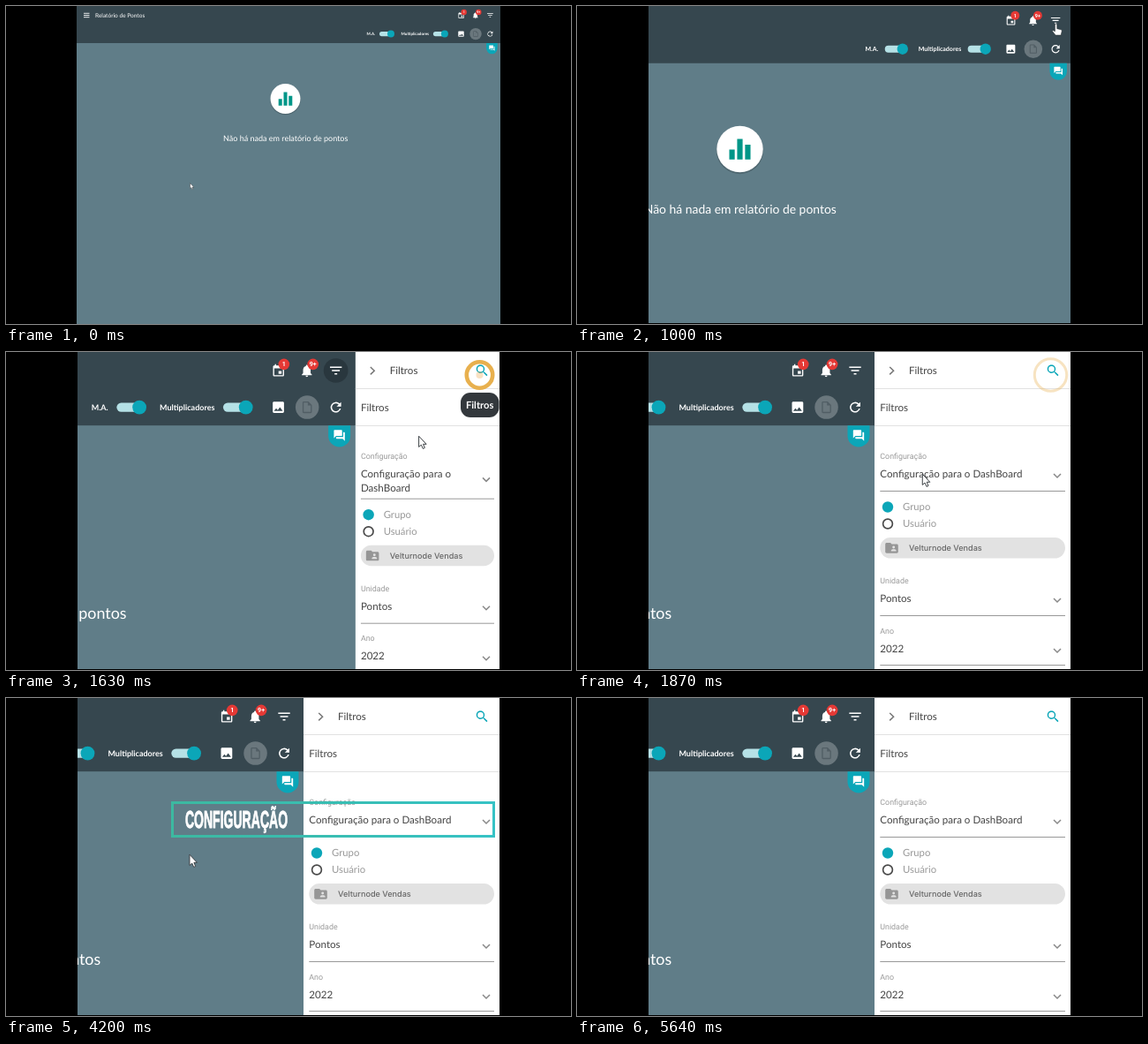
An HTML page that plays this animation: 640x360 px, repeating every 5670 ms.

```html
<!DOCTYPE html>
<html lang="pt">
<head>
<meta charset="utf-8">
<title>Filtros</title>
<style>
  html, body { margin: 0; width: 100%; height: 100%; overflow: hidden; background: #000; }
  svg { display: block; width: 640px; height: 360px; }
  text { font-family: Lato, "Open Sans", sans-serif; text-rendering: geometricPrecision; white-space: pre; }
  .label { font: 8.9px Roboto, sans-serif; fill: #9a9a9a; }
  .value { font-size: 11.6px; fill: #444; }
  .option { font-size: 11.3px; fill: #999; }
  .badge { font: 700 3.6px Roboto, sans-serif; fill: #fff; text-anchor: middle; }
  .toggle { font-size: 4.55px; font-weight: 700; fill: #fff; }
  .caption { font: 700 27.5px "Liberation Sans", Arial, sans-serif; fill: #fff; stroke: #fff; stroke-width: 1; text-anchor: middle; }
</style>
</head>
<body>
<svg viewBox="0 0 640 360" xmlns="http://www.w3.org/2000/svg">
  <defs>
    <clipPath id="screen"><rect id="frame"/></clipPath>
    <linearGradient id="sweep" gradientUnits="userSpaceOnUse" y1="0" y2="0">
      <stop offset="0" stop-color="#3cb9a0" stop-opacity="0"/>
      <stop offset=".03" stop-color="#3cb9a0"/>
      <stop offset=".97" stop-color="#36c3c8"/>
      <stop offset="1" stop-color="#36c3c8" stop-opacity="0"/>
    </linearGradient>
  </defs>
  <rect width="640" height="360" fill="#000"/>
  <g clip-path="url(#screen)">
    <g id="camera"></g>
    <g id="drawer"></g>
    <g id="tooltip">
      <rect x="515" y="46" width="43.5" height="28" rx="11" fill="#33383c"/>
      <text x="536.7" y="63.5" font-size="11.2" font-weight="700" fill="#fff" text-anchor="middle">Filtros</text>
    </g>
    <circle id="dot" cx="536.5" cy="26" r="4" fill="#e9a64a"/>
    <circle id="ring" cx="536.5" cy="26" fill="none" stroke="#e8b04e"/>
    <rect id="box" x="188.5" y="118.5" width="364" height="38" fill="none" stroke="url(#sweep)" stroke-width="3"/>
    <g id="caption"><text class="caption" transform="translate(261 147.2) scale(.51 1)">CONFIGURAÇÃO</text></g>
    <g id="cursor">
      <path id="arrow" d="M0 0V6.2L1.4 5 2.4 7.2 3.4 6.7 2.5 4.6H4.3Z" fill="#fff" stroke="#3a3f43" stroke-width=".5"/>
      <path id="hand" transform="translate(.6 0) scale(1.1)" d="M-.7 .4Q0-.5 .7 .4V3.2L3.4 3.9Q4.1 4.2 3.9 5L3.3 7.6H-.3L-2.5 4.8Q-2.1 3.9-.7 5Z" fill="#fff" stroke="#2a3034" stroke-width=".35"/>
    </g>
  </g>
</svg>
<script>
const LOOP = 5670, ZOOM = 1.98, EDGE = 559, OPEN = 222, TEAL = '#0ba6b8';
const $ = id => document.getElementById(id);
const set = (id, attrs) => { for (const k in attrs) $(id).setAttribute(k, attrs[k]); };

const ICONS = {
  event: 'M17 12h-5v5h5v-5zM16 1v2H8V1H6v2H5c-1.1 0-2 .9-2 2v14c0 1.1.9 2 2 2h14c1.1 0 2-.9 2-2V5c0-1.1-.9-2-2-2h-1V1h-2zm3 18H5V8h14v11z',
  bell: 'M12 22c1.1 0 2-.9 2-2h-4c0 1.1.9 2 2 2zm6-6v-5c0-3.1-1.6-5.6-4.5-6.3V4a1.5 1.5 0 0 0-3 0v.7C7.6 5.4 6 7.9 6 11v5l-2 2v1h16v-1l-2-2z',
  filter: 'M10 18h4v-2h-4zM3 6v2h18V6zM6 13h12v-2H6z',
  image: 'M21 19V5c0-1.1-.9-2-2-2H5c-1.1 0-2 .9-2 2v14c0 1.1.9 2 2 2h14c1.1 0 2-.9 2-2zM8.5 13.5l2.5 3 3.5-4.5 4.5 6H5l3.5-4.5z',
  file: 'M14 2H6c-1.1 0-2 .9-2 2v16c0 1.1.9 2 2 2h12c1.1 0 2-.9 2-2V8l-6-6zM6 20V4h7v5h5v11H6z',
  refresh: 'M17.65 6.35A8 8 0 1 0 19.73 14h-2.08A6 6 0 1 1 16.22 7.78L13 11h7V4z',
  chat: 'M21 6h-2v9H6v2c0 .55.45 1 1 1h11l4 4V7c0-.55-.45-1-1-1zm-4 6V3c0-.55-.45-1-1-1H3c-.55 0-1 .45-1 1v14l4-4h10c.55 0 1-.45 1-1z',
  search: 'M15.5 14h-.8l-.3-.3A6.5 6.5 0 1 0 13.7 14.4l.3.3v.8l5 5 1.5-1.5zM9.5 14a4.5 4.5 0 1 1 0-9 4.5 4.5 0 0 1 0 9z',
  folder: 'M20 6h-8l-2-2H4c-1.1 0-2 .9-2 2v12c0 1.1.9 2 2 2h16c1.1 0 2-.9 2-2V8c0-1.1-.9-2-2-2zm-5 3a2 2 0 1 1 0 4 2 2 0 0 1 0-4zm4 8h-8v-1c0-1.3 2.7-2 4-2s4 .7 4 2z'
};
const icon = (name, x, y, size, fill = '#fff') =>
  `<path d="${ICONS[name]}" fill="${fill}" transform="translate(${x} ${y}) scale(${size / 24}) translate(-12 -12)"/>`;
const badge = (x, s) => `<circle cx="${x}" cy="7" r="3.2" fill="#e53935"/><text class="badge" x="${x}" y="8.3">${s}</text>`;
const toggle = x => `<rect x="${x - 13}" y="29" width="15" height="5.2" rx="2.6" fill="#b5e1e6"/><circle cx="${x}" cy="31.6" r="4" fill="${TEAL}"/>`;
const text = (cls, x, y, s, extra = '') => `<text class="${cls}" x="${x}" y="${y}" ${extra}>${s}</text>`;
const line = (x1, x2, y, color) => `<path d="M${x1} ${y}H${x2}" stroke="${color}"/>`;
const chevron = (x, y) => `<path d="M${x - 4} ${y - 2}l4 4 4-4" fill="none" stroke="#888" stroke-width="1.5"/>`;

$('camera').innerHTML = `
  <rect x="80" width="480" height="360" fill="#607d88"/>
  <g id="content">
    <circle cx="316.5" cy="106" r="17.3" fill="#000" opacity=".18"/>
    <circle cx="316.5" cy="105" r="17" fill="#fff"/>
    <path d="M308.7 105.3h4v7.4h-4zM314.5 97.6h4v15.1h-4zM320.3 101.8h4v10.9h-4z" fill="#009688"/>
    <text x="316.7" y="152.6" font-size="9.03" fill="#fff" text-anchor="middle">Não há nada em relatório de pontos</text>
  </g>
  <rect x="80" width="480" height="42" fill="#36474f"/>
  <path d="M88 8.3h6.5M88 10.5h6.5M88 12.7h6.5" stroke="#fff" stroke-width=".9"/>
  <text x="101" y="12.9" font-size="6.55" fill="#fff">Relatório de Pontos</text>
  <g id="tools">
    <path d="M544.1 42h12.6v6a6.3 6.3 0 0 1-12.6 0z" fill="${TEAL}"/>
    ${icon('chat', 550.4, 47.7, 7.5)}
    <circle id="ripple" cx="548.4" cy="10.6" r="7" fill="#263238"/>
    ${icon('event', 515.6, 10.8, 8.4)}${icon('bell', 531.8, 10.7, 8.6)}${icon('filter', 548.4, 10.6, 9)}
    ${badge(518.7, '1')}${badge(535.3, '9+')}
    ${text('toggle', 408.5, 33.2, 'M.A.')}${toggle(436)}
    ${text('toggle', 447.6, 33.2, 'Multiplicadores')}${toggle(496.9)}
    ${icon('image', 515.5, 31.6, 8.6)}
    <circle cx="532" cy="31.6" r="6.7" fill="#6a777d"/>${icon('file', 532, 31.6, 8, '#515e65')}
    ${icon('refresh', 548.4, 31.6, 9)}
  </g>`;

// The drawer lays itself out from its current width.
function drawDrawer(width) {
  const x = EDGE - width, left = x + 6.3, right = 553, wrap = width < 195;
  const drop = wrap ? 8.7 : 0;
  const name = wrap
    ? text('value', left, 142, 'Configuração para o') + text('value', left, 158, 'DashBoard')
    : text('value', left, 142, 'Configuração para o DashBoard');
  $('drawer').innerHTML = width < 1 ? '' : `
    <svg x="${x}" y="0" width="${width + 1}" height="360" viewBox="${x} 0 ${width + 1} 360">
    <rect x="${x}" width="${width + 1}" height="360" fill="#fff"/>
    <path d="M${x + 17.2} 17l4.4 4.2-4.4 4.2" fill="none" stroke="#777" stroke-width="1.5"/>
    ${text('value', x + 39, 25, 'Filtros')}${icon('search', 539.3, 21, 17.5, TEAL)}
    ${line(x, 560, 41.5, '#e2e2e2')}${text('value', left, 66.7, 'Filtros')}${line(x, 560, 83.5, '#e2e2e2')}
    ${text('label', left, 120.8, 'Configuração')}${name}${chevron(544, 140 + drop / 2)}
    <g transform="translate(0 ${drop})">
      ${line(left, right, 157.5, '#999')}
      <circle cx="${x + 15}" cy="175.5" r="6.2" fill="${TEAL}"/>${text('option', x + 32, 179.3, 'Grupo')}
      <circle cx="${x + 15}" cy="194.5" r="5.4" fill="none" stroke="#4a4a4a" stroke-width="1.7"/>${text('option', x + 32, 198.2, 'Usuário')}
      <rect x="${left}" y="210" width="${Math.max(0, right - left)}" height="23.6" rx="11.8" fill="#e2e2e2"/>
      ${icon('folder', x + 19.5, 221.8, 17.5, '#969696')}
      ${text('', x + 39, 225, 'Velturnode Vendas', 'style="font:500 9.1px Inter,sans-serif" fill="#666"')}
      ${text('label', left, 262, 'Unidade')}${text('value', left, 283, 'Pontos')}${chevron(544, 281)}
      ${line(left, right, 298.5, '#999')}
      ${text('label', left, 318.5, 'Ano')}${text('value', left, 339.7, '2022')}${chevron(544, 338)}
      ${line(left, right, 354.5, '#999')}
    </g></svg>`;
}

const lerp = (a, b, p) => a + (b - a) * p;
const span = (t, a, b) => Math.min(1, Math.max(0, (t - a) / (b - a)));
const smooth = p => (1 - Math.cos(Math.PI * p)) / 2;
const easeOut = p => 1 - (1 - p) * (1 - p);
const linear = p => p;

// Pointer path in page units: time, x, y, easing towards this step.
const PATH = [
  [100, 208.5, 200.5, linear],
  [730, 548.1, 13.1, smooth],
  [1540, 548.1, 13.1, linear],
  [1630, 513.5, 48, linear],
  [1870, 475.2, 69.7, linear],
  [2320, 382.2, 89.5, easeOut]
];
function pointer(t) {
  const i = PATH.findIndex(step => t < step[0]);
  if (i === 0) return PATH[0].slice(1, 3);
  if (i < 0) return PATH[PATH.length - 1].slice(1, 3);
  const [a, b] = [PATH[i - 1], PATH[i]], p = b[3](span(t, a[0], b[0]));
  return [lerp(a[1], b[1], p), lerp(a[2], b[2], p)];
}

function render(t) {
  const z = smooth(span(t, 670, 1290)), scale = lerp(1, ZOOM, z);
  const width = OPEN * easeOut(span(t, 1561, 1705));
  const camera = `translate(560 0) scale(${scale}) translate(-560 0)`;
  const inset = z > 0 ? 1 : 0;
  set('frame', { x: 80 + inset, y: 0, width: 480 - 2 * inset, height: 360 - inset });
  set('camera', { transform: camera });
  set('tools', { transform: `translate(${-width / ZOOM} 0)` });
  set('content', { transform: `translate(${-width / ZOOM / 2} 0)` });
  drawDrawer(width);

  set('ripple', { opacity: .75 * span(t, 1400, 1480) * (1 - span(t, 1640, 1760)) });
  set('tooltip', { opacity: span(t, 1420, 1500) * (1 - span(t, 1640, 1760)) });
  const clicked = t >= 1530;
  set('ring', {
    r: 14.7 + 3.5 * (t - 1630) / 240,
    'stroke-width': lerp(4.6, 3, span(t, 1630, 1870)),
    opacity: clicked ? 1 - span(t, 1630, 2000) : 0
  });
  set('dot', { opacity: clicked ? .45 * (1 - span(t, 1600, 1720)) : 0 });

  // Soft-edged reveal spreading from a point under the caption.
  const reveal = 1.15 * easeOut(span(t, 2560, 3420)) * (1 - smooth(span(t, 5020, 5500)));
  const grow = Math.max(.001, reveal);
  set('sweep', { x1: 298 - 111 * grow, x2: 298 + 256 * grow });
  set('box', { opacity: reveal > .01 ? 1 : 0 });
  set('caption', { opacity: span(t, 2620, 2900) * (1 - span(t, 5200, 5480)) });

  const [x, y] = pointer(t), over = t > 690 && t < 1560;
  set('cursor', { transform: `${camera} translate(${x} ${y})`, opacity: t < 5420 ? 1 : 0 });
  set('arrow', { opacity: over ? 0 : 1 });
  set('hand', { opacity: over ? 1 : 0 });
}

const start = performance.now();
function tick() {
  render((performance.now() - start) % LOOP);
  requestAnimationFrame(tick);
}
tick();
</script>
</body>
</html>
```
